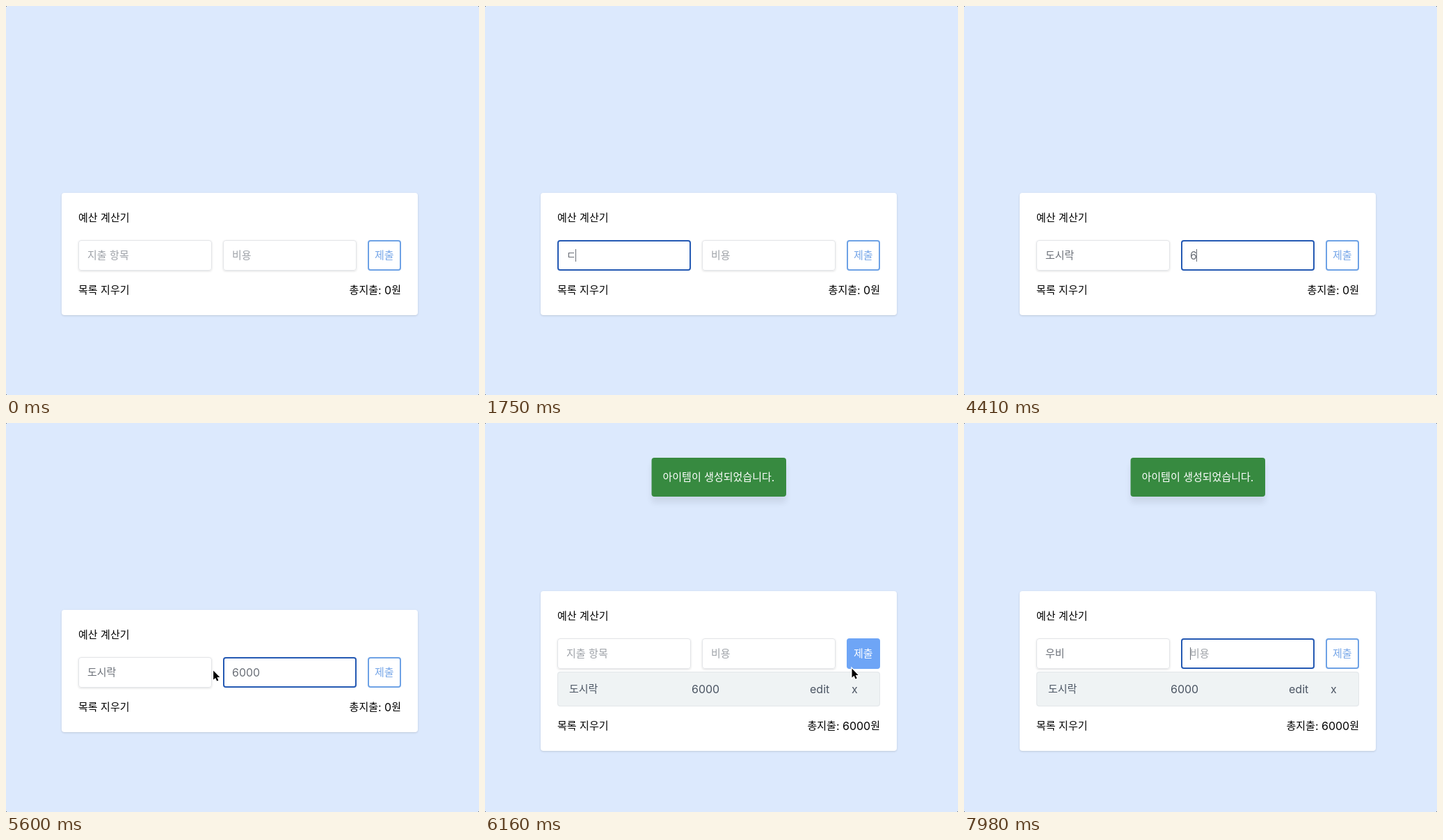
Animation of 680 by 560 pixels, one loop 8000 ms. Source, as an HTML page with a canvas:

```html
<!DOCTYPE html>
<html lang="ko">
<head>
<meta charset="utf-8">
<title>예산 계산기</title>
<style>
html, body { margin: 0; width: 100%; height: 100%; overflow: hidden; background: #dce9fd; }
canvas { display: block; }
</style>
</head>
<body>
<canvas id="stage" width="680" height="560"></canvas>
<script>
const ctx = document.getElementById('stage').getContext('2d');
const LOOP = 8000, TICK = 70, BLINK = 7 * TICK, RING = 2 * TICK, SUBMIT = 6160;
const HANGUL = '350 15px "Noto Sans CJK KR", "Noto Sans CJK", sans-serif';
const LATIN = '16px Inter, sans-serif';
const INK = '#4b5563', GRAY = '#6b7078', PALE = '#9fa3a9', WHITE = '#fff', BLACK = '#000';
const LEFT = 104, RIGHT = 568, CONTROL_H = 44, FIELD_W = 192, BUTTON_W = 48;
const BUTTON_X = RIGHT - BUTTON_W;
const FIELDS = [
  { name: 'item', x: LEFT, hint: '지출 항목' },
  { name: 'cost', x: LEFT + FIELD_W + 16, hint: '비용' }
];

// One edit per key press, evenly spaced
const typing = (field, at, gap, values) => values.map((value, i) => ({ field, at: at + i * gap, value }));
const edits = [
  ...typing('item', 1680, 150, ['ㄷ', '도', '돗', '도시', '도실', '도시라', '도시락', '도시락 ']),
  ...typing('item', 3430, 0, ['도시락']),
  ...typing('cost', 4410, 140, ['6', '60', '600', '6000']),
  ...typing('item', SUBMIT, 0, ['']),
  ...typing('cost', SUBMIT, 0, ['']),
  ...typing('item', 7210, 160, ['ㅇ', '우', '웁', '우비'])
];
const focuses = [
  { at: 1190, field: 'item' },
  { at: 3430, field: 'cost' },
  { at: 6020 },
  { at: 6720, field: 'item' },
  { at: 7980, field: 'cost' }
];
const glides = [
  { at: 70, end: 560, from: [541, 535], to: [230, 350], click: true },
  { at: 910, end: 1050, from: [230, 351], to: [227, 357] },
  { at: 5530, end: 6020, from: [232, 357], to: [527, 353], click: true },
  { at: SUBMIT, end: 6580, from: [527, 353], to: [229, 328], bow: 25, click: true },
  { at: 6650, end: 6720, from: [229, 328], to: [229, 324] }
];

const latest = (events, t) => events.filter(e => e.at <= t).pop();
const startOf = event => event ? event.at : -1;

function valueOf(field, t) {
  const edit = latest(edits.filter(e => e.field === field), t);
  return edit ? edit.value : '';
}

// The pointer hides while keys are pressed
function pointerAt(t) {
  const glide = latest(glides, t);
  if (!glide || startOf(latest(edits, t)) > glide.at) return null;
  const { at, end, from, to, bow = 0, click } = glide;
  const k = Math.sin(Math.min(1, (t - at) / (end - at)) * Math.PI / 2);
  return {
    x: from[0] + (to[0] - from[0]) * k,
    y: from[1] + (to[1] - from[1]) * k + bow * Math.sin(Math.PI * k),
    pressed: click && t >= end && t < end + RING
  };
}

// Korean and Latin runs use separate faces
function eachRun(str, visit) {
  let width = 0;
  for (const run of str.match(/[가-힣ㄱ-ㅎ]+|[^가-힣ㄱ-ㅎ]+/g) || []) {
    const korean = /[가-힣ㄱ-ㅎ]/.test(run);
    ctx.font = korean ? HANGUL : LATIN;
    if (visit) visit(run, width, korean ? 5 : 6);
    width += ctx.measureText(run).width;
  }
  return width;
}

function text(str, x, middle, color, alignRight) {
  if (alignRight) x -= eachRun(str);
  ctx.fillStyle = color;
  eachRun(str, (run, dx, dy) => ctx.fillText(run, x + dx, middle + dy));
}

function box(x, y, w, h, fill, shadow) {
  ctx.save();
  if (shadow) {
    ctx.shadowColor = `rgba(0,0,0,${shadow.alpha})`;
    ctx.shadowOffsetY = shadow.dy;
    ctx.shadowBlur = shadow.blur;
  }
  ctx.fillStyle = fill;
  ctx.beginPath();
  ctx.roundRect(x, y, w, h, 4);
  ctx.fill();
  ctx.restore();
}

function outline(x, y, w, h, color, line) {
  ctx.strokeStyle = color;
  ctx.lineWidth = line;
  ctx.beginPath();
  ctx.roundRect(x + line / 2, y + line / 2, w - line, h - line, 4 - line / 2);
  ctx.stroke();
}

function drawField({ name, x, hint }, y, t) {
  const value = valueOf(name, t);
  const focus = latest(focuses, t);
  const focused = focus && focus.field === name;
  const middle = y + CONTROL_H / 2;
  box(x, y, FIELD_W, CONTROL_H, WHITE, focused ? null : { alpha: 0.12, dy: 1, blur: 3 });
  outline(x, y, FIELD_W, CONTROL_H, focused ? '#2459b3' : '#e3e5e8', focused ? 2 : 1);
  text(value || hint, x + 13, middle, value ? GRAY : PALE);

  const idle = t - Math.max(startOf(focus), startOf(latest(edits, t)));
  if (focused && idle % (2 * BLINK) < BLINK) {
    ctx.fillStyle = GRAY;
    ctx.fillRect(Math.floor(x + 13 + eachRun(value)), middle - 9, 1, 18);
  }
}

function drawButton(y, hover) {
  if (hover) box(BUTTON_X, y, BUTTON_W, CONTROL_H, '#6ea5f6');
  else outline(BUTTON_X, y, BUTTON_W, CONTROL_H, '#6ea2e5', 2);
  text('제출', BUTTON_X + 10, y + CONTROL_H / 2, hover ? WHITE : '#76a6e8');
}

function drawAlert() {
  box(239.5, 50, 193.5, 56, '#378a40', { alpha: 0.08, dy: 9, blur: 9 });
  text('아이템이 생성되었습니다.', 255.5, 78, WHITE);
}

function drawRow(y) {
  box(LEFT, y, RIGHT - LEFT, 50, '#eff3f4');
  outline(LEFT, y, RIGHT - LEFT, 50, '#e2e6e9', 1);
  const cells = { 121: '도시락', 297: '6000', 467: 'edit', 527: 'x' };
  for (const x in cells) text(cells[x], +x, y + 25, INK);
}

// Dark line over a wider white halo
function haloStroke(line, halo) {
  ctx.strokeStyle = WHITE;
  ctx.lineWidth = line + halo;
  ctx.stroke();
  ctx.strokeStyle = BLACK;
  ctx.lineWidth = line;
  ctx.stroke();
}

function drawRing() {
  ctx.beginPath();
  ctx.arc(0, 1, 20, 0, Math.PI * 2);
  haloStroke(3, 2);
}

function drawArrow() {
  const path = new Path2D('M.5 .5V13.5L3.5 10.8 5.6 15.4 7.7 14.5 5.7 10H9.7Z');
  ctx.strokeStyle = WHITE;
  ctx.lineWidth = 2.4;
  ctx.stroke(path);
  ctx.fillStyle = BLACK;
  ctx.fill(path);
}

function drawBeam() {
  ctx.beginPath();
  ctx.moveTo(0, -6.5);
  ctx.lineTo(0, 6.5);
  for (const end of [-1, 1]) {
    ctx.moveTo(-3.5, 8 * end);
    ctx.quadraticCurveTo(0, 8 * end, 0, 6.5 * end);
    ctx.quadraticCurveTo(0, 8 * end, 3.5, 8 * end);
  }
  haloStroke(1.3, 1.5);
}

function drawPointer({ x, y, pressed }, overField) {
  ctx.save();
  ctx.translate(x, y);
  if (pressed) drawRing();
  if (overField) drawBeam();
  else drawArrow();
  ctx.restore();
}

function draw(t) {
  const done = t >= SUBMIT;
  const height = done ? 230 : 176;
  const top = 357 - height / 2;
  const controls = top + 68, footer = top + height - 36;
  const pointer = pointerAt(t);
  const over = (x, w) => pointer && pointer.x >= x && pointer.x < x + w
    && pointer.y >= controls && pointer.y < controls + CONTROL_H;

  ctx.fillStyle = '#dce9fd';
  ctx.fillRect(0, 0, 680, 560);
  ctx.fillStyle = '#5d636d';
  for (const x of [0, 679]) for (const y of [0, 559]) ctx.fillRect(x, y, 1, 1);

  if (done) drawAlert();
  box(80, top, 512, height, WHITE, { alpha: 0.14, dy: 1, blur: 3 });
  text('예산 계산기', LEFT, top + 36, BLACK);
  FIELDS.forEach(field => drawField(field, controls, t));
  drawButton(controls, over(BUTTON_X, BUTTON_W));
  if (done) drawRow(358);
  text('목록 지우기', LEFT, footer, BLACK);
  text(`총지출: ${done ? 6000 : 0}원`, RIGHT, footer, BLACK, true);
  if (pointer) drawPointer(pointer, FIELDS.some(field => over(field.x, FIELD_W)));
}

const start = performance.now();
function frame() {
  const t = (performance.now() - start) % LOOP;
  draw(Math.floor(t / TICK) * TICK);
  requestAnimationFrame(frame);
}
frame();
</script>
</body>
</html>
```
